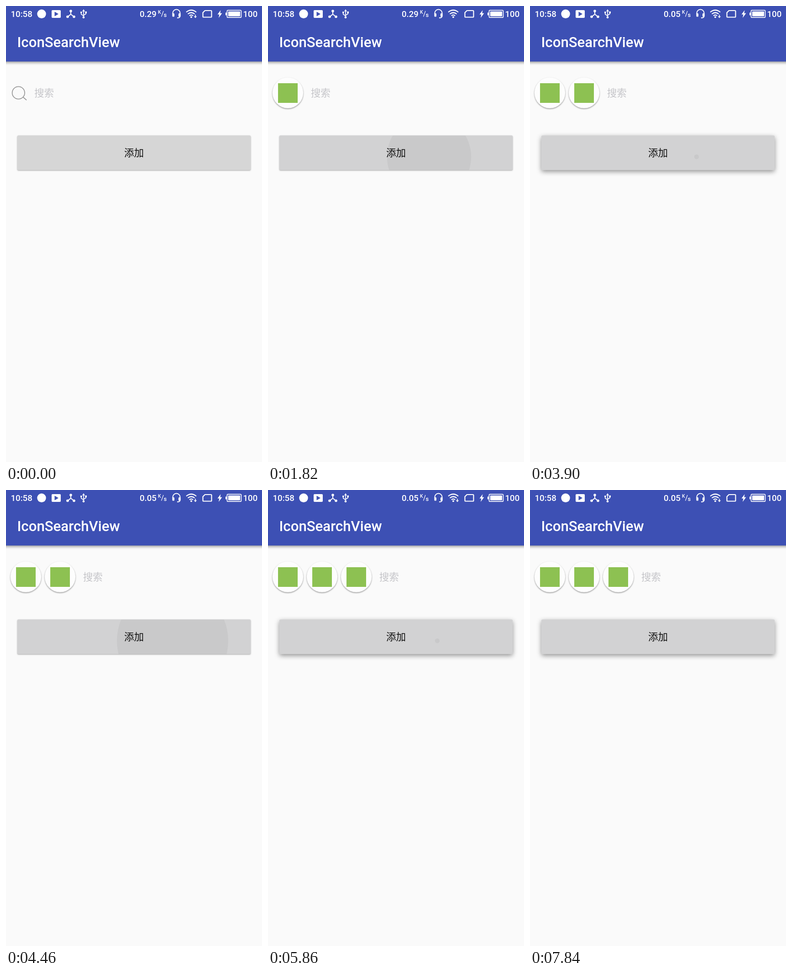
An HTML page with a canvas that plays this animation: 561x998 px, repeating every 8 s.

```html
<!DOCTYPE html>
<html lang="zh-CN">
<head>
<meta charset="utf-8">
<style>
  html, body { margin: 0; width: 561px; height: 998px; overflow: hidden; background: #fafafa; }
  canvas { display: block; }
</style>
</head>
<body>
<canvas id="stage" width="561" height="998"></canvas>
<script>
const ctx = document.getElementById('stage').getContext('2d');
const LOOP = 8000, BLUE = '#3d50b4', WHITE = '#fff';
const LATIN = 'Roboto, sans-serif', CJK = '"Noto Sans CJK SC", "Noto Sans CJK", sans-serif';

// Each tap: finger down, finger up, end of the highlight, ripple centre
const taps = [
  { down: 1050, up: 1500, end: 2640, x: 353 },
  { down: 3480, up: 3900, end: 5200, x: 365 },
  { down: 5340, up: 5860, end: 7260, x: 371 },
  { down: 7540, up: Infinity, end: Infinity, x: 365 }
];

const clamp = v => Math.max(0, Math.min(1, v));
const smooth = v => { v = clamp(v); return v * v * (3 - 2 * v); };

function text(str, x, y, font, color, align = 'left') {
  ctx.font = font;
  ctx.fillStyle = color;
  ctx.textAlign = align;
  ctx.fillText(str, x, y);
}
function rect(x, y, w, h, color, r = 0) {
  ctx.fillStyle = color;
  ctx.beginPath();
  ctx.roundRect(x, y, w, h, r);
  ctx.fill();
}
function disc(x, y, r, color) {
  ctx.fillStyle = color;
  ctx.beginPath();
  ctx.arc(x, y, r, 0, 7);
  ctx.fill();
}
function fill(d, color = WHITE) {
  ctx.fillStyle = color;
  ctx.fill(new Path2D(d));
}
function line(d, width, color = WHITE) {
  ctx.strokeStyle = color;
  ctx.lineWidth = width;
  ctx.stroke(new Path2D(d));
}
function withShadow(dy, blur, alpha, draw) {
  ctx.save();
  ctx.shadowColor = `rgba(0,0,0,${alpha})`;
  ctx.shadowOffsetY = dy;
  ctx.shadowBlur = blur;
  draw();
  ctx.restore();
}

function statusBar(t) {
  const small = '500 18.6px ' + LATIN;
  text('10:58', 10.5, 24, small, WHITE);

  disc(78, 17.3, 9.7, WHITE);
  rect(100, 9, 20, 17, WHITE, 2);
  fill('M106.5 12.5L115 17.5L106.5 22.5Z', BLUE);

  line('M142 11V18L135 23.5M142 18L149 23.5', 2);
  for (const [x, y] of [[142, 11], [135, 23.5], [149, 23.5]]) disc(x, y, 2.8, WHITE);

  line('M170 10V25M164.8 14V18L170 21.5M175.2 13.5V17L170 20.5', 1.7);
  fill('M167 12L170 7L173 12Z');
  disc(170, 24.8, 2.4, WHITE);
  disc(164.8, 14, 1.9, WHITE);
  rect(173.4, 12, 3.6, 3.6, WHITE);

  text(t < 2820 ? '0.29' : '0.05', 293, 24, small, WHITE);
  text('K', 333, 16.5, '500 10.5px ' + LATIN, WHITE);
  line('M340.5 23.5L345 11', 1.2);
  text('s', 345.5, 24, '500 13px ' + LATIN, WHITE);

  line('M365.5 18V15.5A8 8 0 0 1 381.5 15.5V22Q381.5 26 375 26', 2);
  rect(364.5, 16, 4.5, 7.5, WHITE, 1.5);
  rect(378, 16, 4.5, 7.5, WHITE, 1.5);

  line('M395 13.5Q406 4.5 417 13.5M398.5 17.5Q406 11.5 413.5 17.5M402 21.3Q406 18 410 21.3', 2.2);
  disc(406, 24.3, 2, WHITE);
  if (t < 520 || t >= 2820) {
    line('M415 19V24', 1.6);
    fill('M411.8 22.5H418.2L415 26.5Z');
  }

  line('M436 10H449Q450.5 10 450.5 11.5V23Q450.5 24.5 449 24.5H433Q431.5 24.5 431.5 23V14.5Z', 2.2);
  fill('M470.5 9L463.5 18.5H467.5L466 26L473.5 15.8H469.3Z');

  line('M486 9.3H514Q515.5 9.3 515.5 11V23.5Q515.5 25.2 514 25.2H486Q484.5 25.2 484.5 23.5V11Q484.5 9.3 486 9.3Z', 1.7);
  rect(487, 12, 26, 10.6, WHITE, 1);
  rect(481, 14.2, 2.6, 6.2, WHITE, 1);
  text('100', 519.5, 24, small, WHITE);
}

function searchRow(count) {
  if (!count) {
    ctx.lineCap = 'round';
    line('M13.6 190A13.7 13.7 0 1 1 41 190A13.7 13.7 0 1 1 13.6 190M37.5 199.5L44.5 205.5', 1.8, '#9b9b9b');
    ctx.lineCap = 'butt';
  }
  for (let i = 0; i < count; i++) {
    const x = 43.5 + 75 * i;
    withShadow(1.5, 3, 0.4, () => disc(x, 190, 33.7, '#fdfdfd'));
    rect(x - 21.5, 169, 43, 43, '#8dc152');
  }
  text('搜索', count ? 18.7 + 75 * count : 62, 198, '21.6px ' + CJK, '#c5c5c9');
}

function button(t, tap) {
  const lift = tap ? smooth((t - tap.down) / 210) * (1 - smooth((t - tap.up - 40) / 220)) : 0;
  const pressed = tap && t < tap.end;
  withShadow(1 + 2.5 * lift, 3 + 8 * lift, 0.36 + 0.06 * lift, () =>
    rect(25, 283.5, 511, 75.5, pressed ? '#d2d2d3' : '#d6d6d6', 2));

  if (tap && t > tap.up) {
    const age = t - tap.up;
    ctx.save();
    ctx.beginPath();
    ctx.rect(25, 283.5, 511, 75.5);
    ctx.clip();
    disc(tap.x, 330, 5.15 * Math.sqrt(age), `rgba(0,0,0,${0.045 * clamp((1000 - age) / 400)})`);
    ctx.restore();
  }
  text('添加', 280.5, 329, '500 21.6px ' + CJK, '#111', 'center');
}

function draw(t) {
  rect(0, 0, 561, 998, '#fafafa');
  withShadow(2, 6, 0.4, () => rect(-10, -10, 581, 131.5, BLUE));
  statusBar(t);
  text('IconSearchView', 24.5, 90, '500 31.2px ' + LATIN, WHITE);
  searchRow(taps.filter(tap => t >= tap.up).length);
  button(t, taps.filter(tap => t >= tap.down).pop());
}

function tick() {
  draw(performance.now() % LOOP);
  requestAnimationFrame(tick);
}
tick();
</script>
</body>
</html>
```
